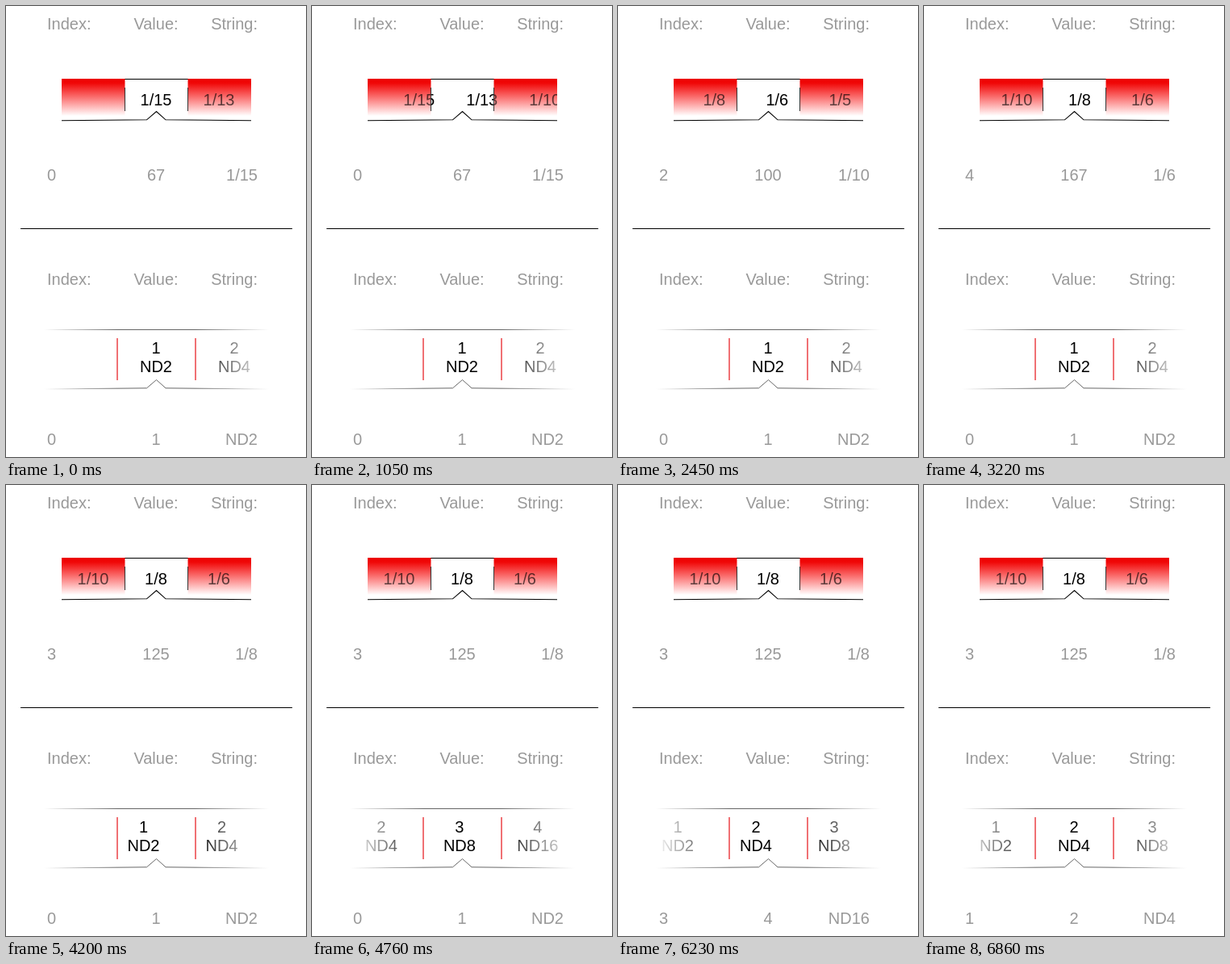
Write an HTML page that moves like this. It is 372 px wide and 558 px high and loops after 7.84 s.

```html
<!DOCTYPE html>
<html lang="en">
<head>
<meta charset="utf-8">
<title>Pickers</title>
<style>
  html, body { margin: 0; width: 100%; height: 100%; overflow: hidden; background: #fff; }
  svg { display: block; width: 100vw; height: 100vh; }
  text { font: 20px "Liberation Sans", Arial, sans-serif; }
  .label { fill: #999; }
  .item, .mid { text-anchor: middle; }
  .end { text-anchor: end; }
  path { fill: none; }
</style>
</head>
<body>
<svg viewBox="0 0 372 558">
  <defs>
    <linearGradient id="red" x2="0" y2="1">
      <stop offset="0" stop-color="#ec0000"/>
      <stop offset=".12" stop-color="#f00808"/>
      <stop offset="1" stop-color="#f00" stop-opacity="0"/>
    </linearGradient>
    <linearGradient id="fade" gradientUnits="userSpaceOnUse" x1="47" x2="326">
      <stop offset="0" stop-color="#fff" stop-opacity="0"/>
      <stop offset=".33" stop-color="#fff"/>
      <stop offset=".67" stop-color="#fff"/>
      <stop offset="1" stop-color="#fff" stop-opacity="0"/>
    </linearGradient>
    <mask id="cells" maskUnits="userSpaceOnUse" x="69" y="90" width="235" height="52">
      <path d="M69 90H147.5V142H69ZM225.5 90H304V142H225.5Z" style="fill:#fff" fill-opacity=".63"/>
      <rect x="147.5" y="90" width="78" height="52" fill="#fff"/>
    </mask>
    <mask id="edges" maskUnits="userSpaceOnUse" x="47" y="395" width="279" height="85">
      <rect x="47" y="395" width="279" height="85" fill="url(#fade)"/>
    </mask>
  </defs>

  <path d="M18 275.5H355" stroke="#000"/>

  <path d="M69 90.5H304" stroke="#000"/>
  <rect x="69" y="90" width="78.5" height="46" fill="url(#red)"/>
  <rect x="225.5" y="90" width="78.5" height="46" fill="url(#red)"/>
  <g mask="url(#cells)"><g id="speeds"></g></g>
  <path d="M147.5 101V130M225.5 101V130" stroke="#333"/>
  <path d="M69 141.7L174.500 140.800L186.500 130.500L198 140.800L304 141.700" stroke="#000" stroke-width="1.1"/>

  <g mask="url(#edges)">
    <g id="filters"></g>
    <path d="M47 400.500H326M47 474L174.500 472.800L186.500 462.500L198 472.800L326 474" stroke="#666"/>
  </g>
  <path d="M138 411V463M235 411V463" stroke="#e8262a" stroke-width="1.300"/>
</svg>
<script>
const LOOP = 7840, STEP = 70, CENTER = 186;
const svg = document.querySelector("svg");

function addText(parent, x, y, cls, str = "") {
  const el = document.createElementNS("http://www.w3.org/2000/svg", "text");
  el.setAttribute("x", x);
  el.setAttribute("y", y);
  el.setAttribute("class", cls);
  el.textContent = str;
  parent.append(el);
  return el;
}

function addRow(y, words) {
  return [[51, ""], [CENTER, "mid"], [312, "end"]].map(([x, cls], i) =>
    addText(svg, x, y, "label " + cls, words[i]));
}

// Each swipe: drag points [time, position], the last one being the release, then a settle.
const pickers = [
  {
    strip: document.getElementById("speeds"), pitch: 78, rows: [123], top: 29, bottom: 216,
    items: [15, 13, 10, 8, 6, 5, 4].map(d => ({ value: Math.round(1000 / d), name: "1/" + d })),
    lines: item => [item.name],
    swipes: [
      { drag: [[910, 0], [980, .16], [1260, 2.25]], end: 1610, to: 2 },
      { drag: [[1890, 2], [1960, 2.12], [2590, 4.35]], end: 2870, to: 4 },
      { drag: [[3080, 4], [3150, 3.55], [3220, 2.91], [3290, 2.76]], end: 3640, to: 3 }
    ]
  },
  {
    strip: document.getElementById("filters"), pitch: 97, rows: [430, 453], top: 345, bottom: 543,
    items: [1, 2, 3, 4, 5, 6].map(n => ({ value: n, name: "ND" + 2 ** n })),
    lines: item => [item.value, item.name],
    swipes: [
      { drag: [[4130, 0], [4200, .16], [4900, 2.5], [5320, 3.35]], end: 5600, to: 3 },
      { drag: [[5810, 3], [5880, 2.84], [6230, 1.155], [6370, .7]], end: 6860, to: 1 }
    ]
  }
];

for (const p of pickers) {
  p.items.forEach((item, i) => p.lines(item).forEach((str, row) =>
    addText(p.strip, CENTER + i * p.pitch, p.rows[row], "item", str)));
  addRow(p.top, ["Index:", "Value:", "String:"]);
  p.labels = addRow(p.bottom, []);
}

function stateAt(swipes, t) {
  let pos = 0, index = 0;
  for (const { drag, end, to } of swipes) {
    if (t < drag[0][0]) break;
    const [release, peak] = drag[drag.length - 1];
    if (t < release) {
      const i = drag.findIndex(([time]) => time > t);
      const [t0, p0] = drag[i - 1], [t1, p1] = drag[i];
      pos = p0 + (p1 - p0) * (t - t0) / (t1 - t0);
    } else {
      const left = Math.max(0, (end - t) / (end - release));
      pos = to + (peak - to) * left * left;
      index = to;
    }
  }
  return { pos, index };
}

function draw(now) {
  const t = Math.floor((now % LOOP) / STEP) * STEP;
  for (const p of pickers) {
    const { pos, index } = stateAt(p.swipes, t);
    const { value, name } = p.items[index];
    p.strip.setAttribute("transform", `translate(${(-pos * p.pitch).toFixed(2)} 0)`);
    [index, value, name].forEach((v, i) => { p.labels[i].textContent = v; });
  }
}

const start = performance.now();
function tick() {
  draw(performance.now() - start);
  requestAnimationFrame(tick);
}
tick();
</script>
</body>
</html>
```
